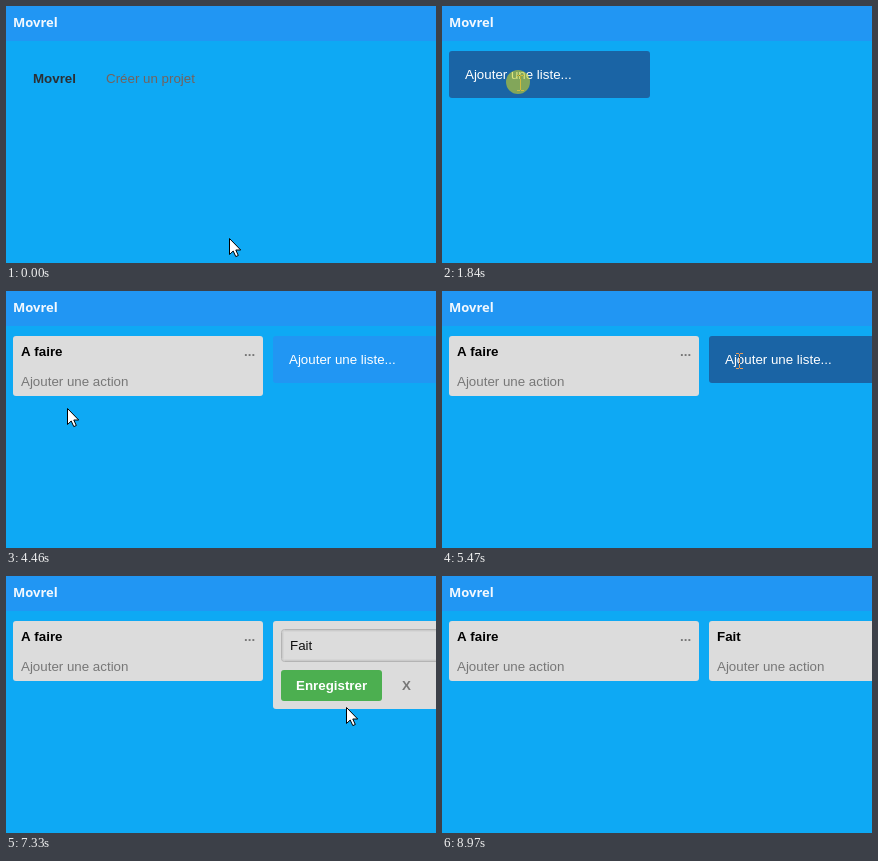
Animation, 430 px wide and 257 px high, one loop 9670 ms. Source, as an HTML page with a canvas:

```html
<!DOCTYPE html>
<html lang="fr">
<head>
<meta charset="utf-8">
<title>Movrel</title>
<style>
html, body { margin: 0; width: 100%; height: 100%; overflow: hidden; background: #0ea9f4; }
canvas { display: block; width: 430px; height: 257px; }
</style>
</head>
<body>
<canvas id="stage"></canvas>
<script>
const W = 430, H = 257, LOOP = 9670;
const NAME = 'Movrel';
const SANS = '13.333px "Liberation Sans", Arial, sans-serif';
const BOLD = 'bold ' + SANS;
const BRAND = 'bold 13px "Open Sans", "Noto Sans", sans-serif';
const GREY = '#dcdcdc', BLUE = '#2196f3', MUTED = '#777';

const canvas = document.getElementById('stage');
const ctx = canvas.getContext('2d');
const ratio = window.devicePixelRatio || 1;
canvas.width = W * ratio;
canvas.height = H * ratio;

// Stepped pointer moves; the pointer is an arrow until it takes its end shape.
const moves = [
  { from: 70, to: 660, steps: 9, end: 'hand', path: [[223, 232], [150, 150], [80, 66], [56, 56], [51, 77]] },
  { from: 1060, to: 1060, steps: 1, end: 'beam', path: [[51, 77], [51, 77]] },
  { from: 1520, to: 1670, steps: 3, end: 'beam', path: [[51, 77], [66, 84], [78, 77]] },
  { from: 3780, to: 4160, steps: 6, end: 'arrow', path: [[78, 77], [70, 96], [61, 117]] },
  { from: 5010, to: 5400, steps: 6, end: 'beam', path: [[61, 117], [180, 98], [285, 73], [297, 70]] },
  { from: 7180, to: 7330, steps: 3, end: 'arrow', path: [[297, 70], [340, 131]] },
  { from: 7400, to: 7720, steps: 5, end: 'arrow', path: [[340, 131], [325, 111]] },
  { from: 8510, to: 8970, steps: 7, end: 'arrow', path: [[325, 111], [350, 165], [385, 275]] }
];
const clicks = [[980, 1060], [1840, 1910], [4330, 4460], [5550, 5620], [8040, 8110]];

const forms = [
  { x: 7, open: 1910, saved: 4460, off: [[2370, 2690], [3780, 4330]],
    keys: [[2690, 'A'], [2840, ' '], [2920, 'f'], [3000, 'a'], [3080, 'i'], [3230, 're']] },
  { x: 267, open: 5620, saved: 8110, off: [[6080, 6250], [7180, 7700]],
    keys: [[6250, 'F'], [6400, 'a'], [6550, 'i'], [6630, 't']] }
];

const within = (t, [a, b]) => t >= a && t < b;
const typed = (form, t) => form.keys.filter(k => k[0] <= t).map(k => k[1]).join('');

function along(path, u) {
  const s = u * (path.length - 1);
  const i = Math.min(Math.floor(s), path.length - 2);
  return [0, 1].map(k => Math.round(path[i][k] + (path[i + 1][k] - path[i][k]) * (s - i)));
}

function pointerAt(t) {
  const m = moves.filter(m => m.from <= t).pop();
  if (!m) return { x: 223, y: 232, kind: 'arrow' };
  const gap = (m.to - m.from) / (m.steps - 1) || 1;
  const step = Math.min(Math.floor((t - m.from) / gap + 1e-6) + 1, m.steps);
  const u = step / m.steps;
  const eased = m.steps > 3 ? u * u * (3 - 2 * u) : u;
  const [x, y] = along(m.path, eased);
  return { x, y, kind: step === m.steps ? m.end : 'arrow' };
}

function box(x, y, w, h, color, r = 3) {
  ctx.fillStyle = color;
  ctx.beginPath();
  ctx.roundRect(x, y, w, h, r);
  ctx.fill();
}

function text(s, x, y, color, font = SANS) {
  ctx.font = font;
  ctx.fillStyle = color;
  ctx.fillText(s, x, y);
}

function drawHome() {
  text(NAME, 27, 77, '#2c2f33', BOLD);
  text('Créer un projet', 100, 77, '#75625c');
}

function drawAdder(x, p) {
  const hover = p.x >= x && p.x < x + 201 && p.y >= 45 && p.y < 92;
  box(x, 45, 201, 47, hover ? '#1a64a5' : BLUE);
  text('Ajouter une liste...', x + 16, 73, '#fff');
}

function drawForm(form, t) {
  const x = form.x, value = typed(form, t);
  box(x, 45, 203, 88, GREY);
  ctx.lineWidth = 1;
  ['#b4b4b4', '#cbcbcb', '#d5d5d5'].forEach((color, i) => {
    ctx.strokeStyle = color;
    ctx.beginPath();
    ctx.roundRect(x + 8.5 + i, 53.5 + i, 186 - 2 * i, 32 - 2 * i, 3 - i);
    ctx.stroke();
  });
  text(value, x + 17, 74, '#111');
  if (!form.off.some(span => within(t, span))) {
    ctx.fillStyle = '#000';
    ctx.fillRect(Math.round(x + 17 + ctx.measureText(value).width), 62, 1, 15);
  }
  box(x + 8, 94, 101, 31, '#4caf50');
  text('Enregistrer', x + 23, 114, '#fff', BOLD);
  text('X', x + 129, 114, MUTED, BOLD);
}

function drawList(form, t) {
  const x = form.x;
  box(x, 45, 250, 60, GREY);
  text(typed(form, t), x + 8, 65, '#000', BOLD);
  text('...', x + 231, 65, MUTED, BOLD);
  text('Ajouter une action', x + 8, 95, MUTED);
}

function drawBoard(t, p) {
  for (const form of forms) {
    if (t >= form.saved) {
      drawList(form, t);
    } else {
      if (t >= form.open) drawForm(form, t);
      else drawAdder(form.x, p);
      break;
    }
  }
}

const arrow = new Path2D('M.5 .5V16.5L4.2 13L6.8 18.6L9.3 17.5L6.8 12H11.7Z');
const hand = new Path2D('M-1.5 1.5Q0-.5 1.5 1.5V7Q4 5.5 4.5 8Q7 6.5 7.5 9Q10.5 8 10.5 11' +
  'V15L8.5 18V21.5H-1.5V19L-4.5 14Q-6 11-3.5 11L-1.5 13Z');

function drawPointer({ x, y, kind }) {
  ctx.save();
  ctx.translate(x, y);
  if (kind === 'beam') {
    // The text pointer inverts what lies under it.
    ctx.globalCompositeOperation = 'difference';
    ctx.fillStyle = '#fff';
    for (const [dx, dy, w, h] of [[-3, -8, 3, 1], [1, -8, 3, 1], [0, -7, 1, 14], [-3, 7, 3, 1], [1, 7, 3, 1]]) {
      ctx.fillRect(dx, dy, w, h);
    }
  } else {
    const shape = kind === 'hand' ? hand : arrow;
    ctx.fillStyle = '#fff';
    ctx.strokeStyle = '#000';
    ctx.lineWidth = 1;
    ctx.fill(shape);
    ctx.stroke(shape);
  }
  ctx.restore();
}

function drawClick(p) {
  ctx.fillStyle = 'rgba(200, 210, 40, .6)';
  ctx.beginPath();
  ctx.arc(p.x - 2, p.y - 1, 12, 0, Math.PI * 2);
  ctx.fill();
}

function draw(t) {
  const p = pointerAt(t);
  ctx.setTransform(ratio, 0, 0, ratio, 0, 0);
  ctx.fillStyle = '#0ea9f4';
  ctx.fillRect(0, 0, W, H);
  ctx.fillStyle = BLUE;
  ctx.fillRect(0, 0, W, 35);
  text(NAME, 7, 21, '#f2f8fe', BRAND);
  if (t < 1060) drawHome();
  else drawBoard(t, p);
  drawPointer(p);
  if (clicks.some(span => within(t, span))) drawClick(p);
}

const start = performance.now();
function tick() {
  draw((performance.now() - start) % LOOP);
  requestAnimationFrame(tick);
}
tick();
</script>
</body>
</html>
```
